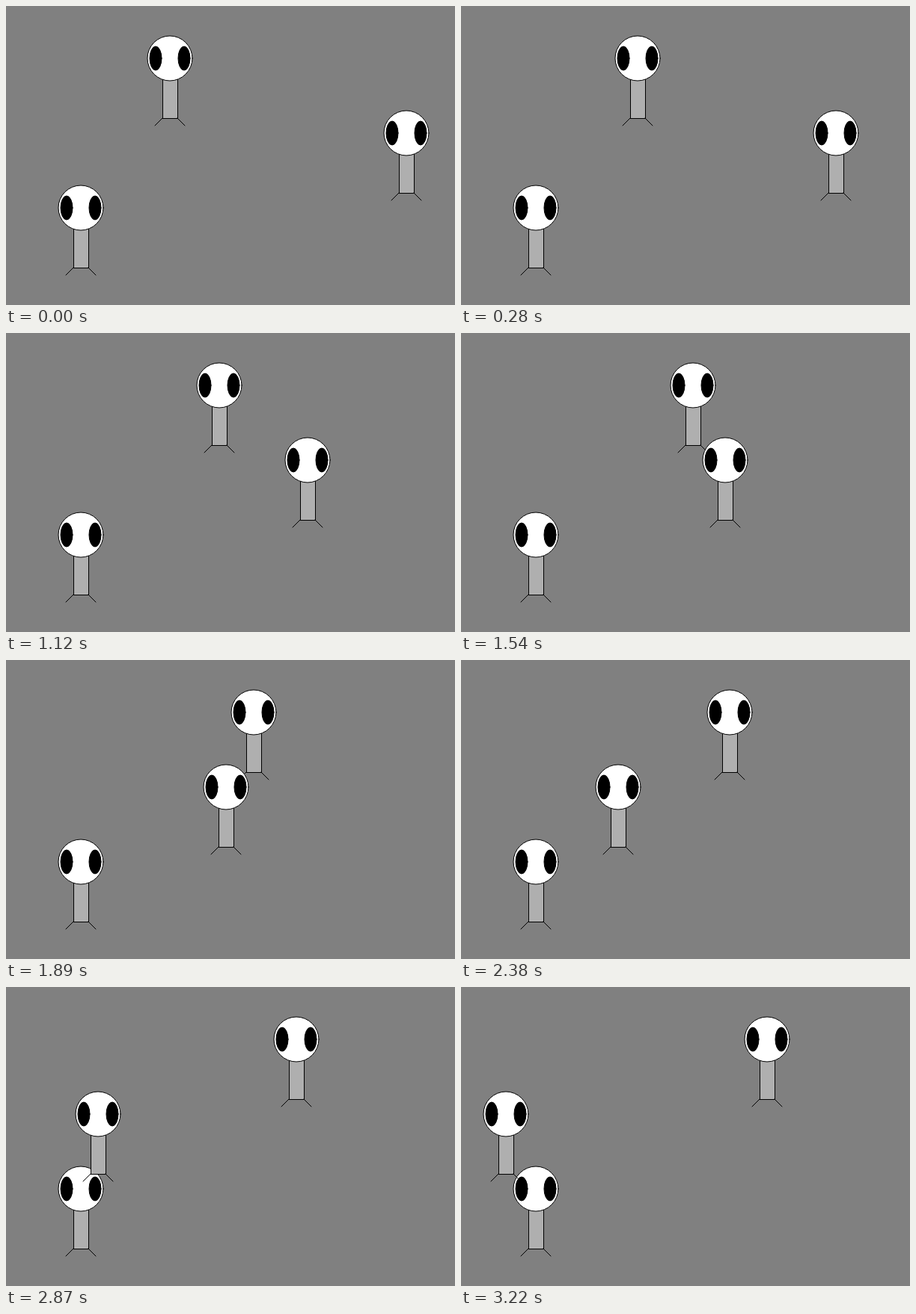
Recreate the animation shown at these times as an HTML page. Size 600 by 400 pixels, loop 3290 ms.

```html
<!DOCTYPE html>
<html lang="en">
<head>
<meta charset="utf-8">
<title>Three walkers</title>
<style>
  html, body { margin: 0; width: 100%; height: 100%; overflow: hidden; background: #808080; }
  svg { display: block; width: 600px; height: 400px; }
</style>
</head>
<body>
<svg viewBox="0 0 600 400">
  <defs>
    <g id="walker" stroke="#000" stroke-linecap="round">
      <rect x="-9.5" y="-49.5" width="20" height="100" fill="#afafaf"/>
      <circle cy="-30" r="30" fill="#fff"/>
      <ellipse cx="-19" cy="-30" rx="8" ry="16"/>
      <ellipse cx="19" cy="-30" rx="8" ry="16"/>
      <path d="M-10 50L-20 60M10 50L20 60" fill="none"/>
    </g>
  </defs>
  <rect width="600" height="400" fill="#808080"/>
  <use id="upper" href="#walker"/>
  <use href="#walker" transform="translate(100 300)"/>
  <use id="middle" href="#walker"/>
</svg>
<script>
  const STEP_MS = 70, STEPS = 47;
  const TRAVEL = 190;   // pixels the upper walker covers in one loop
  const SPEED_UP = 95;  // travel at which the middle walker goes from 2x to 3x

  const upper = document.getElementById('upper');
  const middle = document.getElementById('middle');

  const place = (el, x, y) => el.setAttribute('transform', `translate(${x} ${y})`);

  function draw(ms) {
    const step = Math.floor(ms / STEP_MS + 0.001) % STEPS;
    const travel = Math.round(TRAVEL * step / (STEPS - 1));
    place(upper, 219 + travel, 100);
    place(middle, 535 - 2 * travel - Math.max(0, travel - SPEED_UP), 200);
  }

  let start;
  function tick(now) {
    start ??= now;
    draw(now - start);
    requestAnimationFrame(tick);
  }

  draw(0);
  requestAnimationFrame(tick);
</script>
</body>
</html>
```
